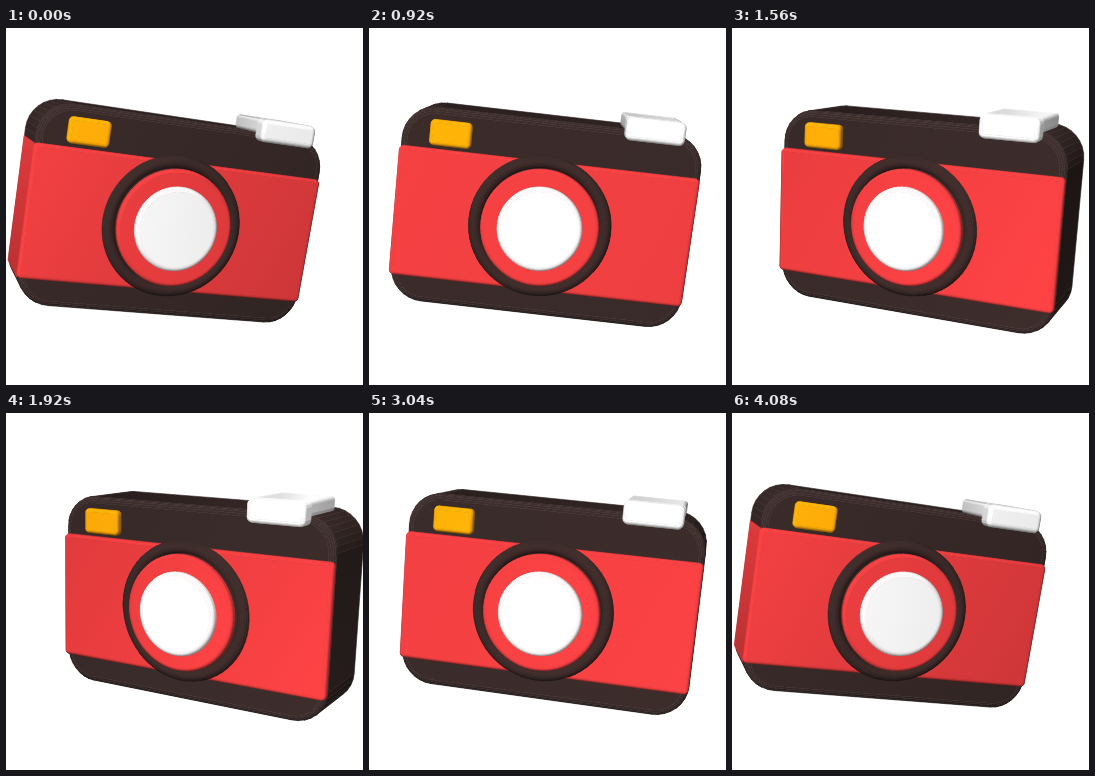
Write an HTML page with a canvas that moves like this. It is 357 px wide and 357 px high and loops after 4120 ms.

```html
<!DOCTYPE html>
<html lang="en">
<head>
<meta charset="utf-8">
<title>Swinging camera</title>
<style>
html, body { margin: 0; width: 100%; height: 100%; overflow: hidden; background: #fff; }
canvas { display: block; }
</style>
</head>
<body>
<canvas id="stage" width="357" height="357"></canvas>
<script>
const ctx = document.getElementById('stage').getContext('2d');
const LOOP = 4120, STEP = 40, RAD = Math.PI / 180;
const DIST = 900, PIVOT = [170.5, 201.6], LIGHT = [-0.25, -0.4, 0.88];
const ROLL = 6.6 * RAD, PITCH = 8.8 * RAD, CAMERA = 2.2 * RAD;
const DARK = [60, 45, 43], RED = [251, 66, 68], YELLOW = [268, 181, 8];
const LENS = [264, 264, 264], METAL = [264, 264, 264];
let yaw = 0;

const sub = (a, b) => a.map((v, i) => v - b[i]);
const dot = (a, b) => a[0] * b[0] + a[1] * b[1] + a[2] * b[2];
const cross = (a, b) => [
  a[1] * b[2] - a[2] * b[1], a[2] * b[0] - a[0] * b[2], a[0] * b[1] - a[1] * b[0]];
const spin = (a, b, t) => [a * Math.cos(t) - b * Math.sin(t), a * Math.sin(t) + b * Math.cos(t)];

// Local axes: x right, y down, z towards the viewer.
function place(x, y, z) {
  [x, y] = spin(x, y, ROLL);
  [z, y] = spin(z, y, PITCH);
  [x, z] = spin(x, z, yaw);
  [z, y] = spin(z, y, CAMERA);
  return [x, y, z];
}

function project([x, y, z]) {
  const k = DIST / (DIST - z);
  return [PIVOT[0] + x * k, PIVOT[1] + y * k];
}

// Nearer points catch a little more light.
function shade(color, normal, z) {
  const facing = Math.max(0, dot(normal, LIGHT) / Math.hypot(...normal));
  const light = Math.min(1.02, 0.47 + 0.65 * facing + z / 750);
  return `rgb(${color.map(c => Math.min(255, Math.round(c * light)))})`;
}

function paint(points, normal, color) {
  const ends = [points[0], points[points.length / 2]];
  const fill = ctx.createLinearGradient(...project(ends[0]), ...project(ends[1]));
  ends.forEach((p, i) => fill.addColorStop(i, shade(color, normal, p[2])));
  ctx.fillStyle = ctx.strokeStyle = fill;
  ctx.beginPath();
  points.forEach(p => ctx.lineTo(...project(p)));
  ctx.closePath();
  ctx.fill();
  ctx.stroke();
}

// Paints a four-sided face only when it looks towards the viewer.
function face(points, color) {
  const [a, b, , d] = points;
  const normal = cross(sub(b, a), sub(d, a));
  if (Math.hypot(...normal) > 1e-6 && dot(normal, sub([0, 0, DIST], a)) > 0)
    paint(points, normal, color);
}

// Clockwise rounded rectangle, pulled inwards by inset.
function outline([x0, y0, x1, y1], r, inset, steps) {
  const points = [];
  for (let c = 0; c < 4; c++) {
    const cx = c === 0 || c === 3 ? x0 + r : x1 - r;
    const cy = c < 2 ? y0 + r : y1 - r;
    for (let i = 0; i <= steps; i++) {
      const a = Math.PI + (c + i / steps) * Math.PI / 2;
      points.push([cx + (r - inset) * Math.cos(a), cy + (r - inset) * Math.sin(a)]);
    }
  }
  return points;
}

// Profiles list [inset, z]; an arc rises from z and bends inwards.
const arc = (z, size, span, steps) => Array.from({ length: steps + 1 }, (_, i) => {
  const a = span * i / steps * RAD;
  return [size * (1 - Math.cos(a)), z + size * Math.sin(a)];
});
const block = (back, front, bevel) => [[0, back], ...arc(front - bevel, bevel, 90, 4)];

function solid(rect, r, profile, color, steps = 3) {
  const rings = profile.map(([inset, z]) =>
    outline(rect, r, inset, steps).map(([x, y]) => place(x, y, z)));
  for (let j = 0; j + 1 < rings.length; j++) {
    const low = rings[j], high = rings[j + 1];
    low.forEach((a, i) => {
      const n = (i + 1) % low.length;
      face([a, low[n], high[n], high[i]], color);
    });
  }
  paint(rings[rings.length - 1], place(0, 0, 1), color);
}

const disc = (r, profile, color) => solid([-r, -r, r, r], r, profile, color, 16);

function draw(time) {
  const swing = (1 - Math.cos(Math.PI * (time - 60) / (LOOP / 2))) / 2;
  yaw = (-17 + 48 * swing) * RAD;
  ctx.fillStyle = '#fff';
  ctx.fillRect(0, 0, 357, 357);
  ctx.lineWidth = 0.6;
  ctx.lineJoin = 'round';

  // Body, with the red band wrapping its left side.
  solid([-148, -108, 155, 94], 34, block(-100, -17, 6), DARK, 8);
  face([place(-149, 67, -95), place(-149, -66, -95),
        place(-149, -66, -18), place(-149, 67, -18)], RED);
  solid([-149, -66, 154.5, 67], 4, block(-22, -15, 3), RED);

  // Viewfinder and shutter button.
  solid([-119, -96, -78, -71], 4, block(-17, -10, 3), YELLOW);
  solid([73, -121, 131, -107], 3, block(-75, -10, 1), METAL);
  solid([73, -121, 131, -99], 5, block(-14, 3, 4), METAL);

  // Lens.
  disc(72.5, arc(-16, 6.5, 180, 8), DARK);
  disc(59.5, block(-11, -4, 3), RED);
  disc(42.5, block(-4, 3, 4), LENS);
}

function frame() {
  draw(Math.floor(performance.now() % LOOP / STEP) * STEP);
  requestAnimationFrame(frame);
}
frame();
</script>
</body>
</html>
```
